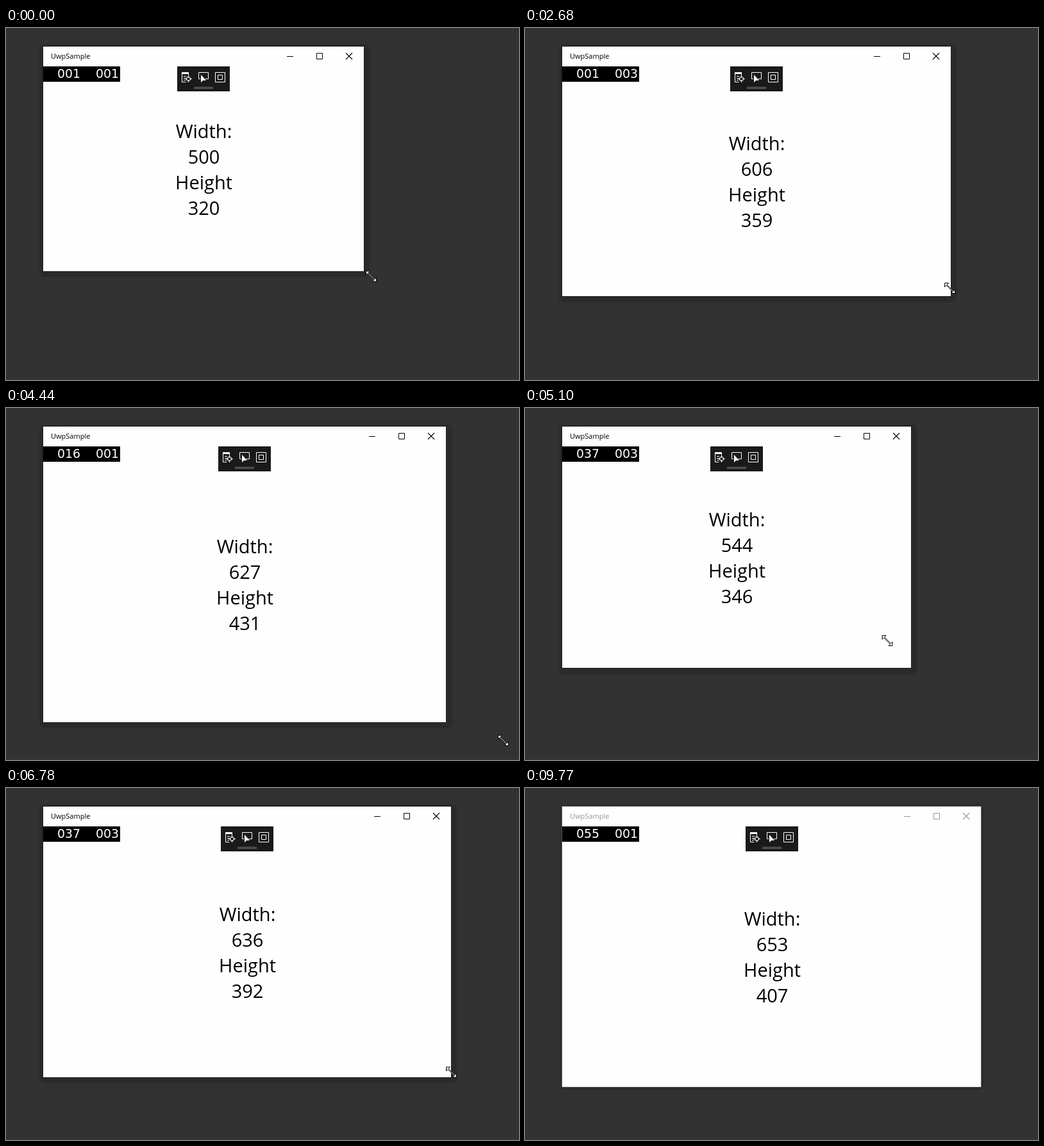
Animation, 800 px wide and 550 px high, one loop 9.87 s. Source, as an HTML page:

```html
<!DOCTYPE html>
<html lang="en">
<head>
<meta charset="utf-8">
<title>Window resize</title>
<style>
  html, body { margin: 0; width: 100%; height: 100%; overflow: hidden; background: #323232; }
  svg { display: block; width: 800px; height: 550px; }
  text { white-space: pre; }
  .label { font: 29px "Open Sans", "Noto Sans", sans-serif; text-anchor: middle; }
  .title { font: 11px "Open Sans", "Noto Sans", sans-serif; }
  .counter { font: 18.9px "DejaVu Sans", sans-serif; fill: #fff; }
  .line { fill: none; stroke: #fff; }
  #caption { color: #000; }
  #caption.idle { color: #959595; }
</style>
</head>
<body>
<svg viewBox="0 0 800 550">
  <defs><filter id="soft" x="-5%" y="-5%" width="110%" height="110%"><feGaussianBlur stdDeviation="1"/></filter></defs>
  <rect width="800" height="550" fill="#323232"/>
  <rect y="547" width="800" height="3" fill="#393237"/>
  <rect id="shadow" rx="7" fill="#2b2b2b" filter="url(#soft)"/>
  <rect id="border"/>
  <rect id="backing" fill="#323232"/>
  <rect id="bar" fill="#fefefe"/>
  <rect id="content" fill="#fefefe"/>

  <g id="caption">
    <text class="title" x="70" y="48" fill="currentColor">UwpSample</text>
    <g id="buttons" fill="none" stroke="currentColor">
      <path d="M-120 44.5h10M-73.500 39.500h9v9h-9z"/>
      <path d="M-28 39l10 10m0-10l-10 10" stroke-width="1.1"/>
    </g>
  </g>

  <rect x="58" y="60" width="120" height="24"/>
  <text class="counter" x="80" y="78" id="rate"></text>
  <text class="counter" x="140" y="78" id="cost"></text>

  <g id="tools">
    <rect x="-41" y="60" width="82" height="39" fill="#1a1a1a"/>
    <path d="M-34 69h11v3h-11z" fill="#fff"/>
    <path class="line" d="M-33.500 72v12.500h6M-23.500 72v2M-31 75.500h4M-31 78.500h3M-31 81.500h3"/>
    <circle class="line" cx="-23.500" cy="79.500" r="3.300"/>
    <path class="line" d="M-29 79.500h4m3 0h4M-23.500 74v4m0 3v4"/>
    <path class="line" d="M-5 79.500h-2.500v-10h15v10h-5"/>
    <path d="M-4 73v12l3-3h5z" fill="#fff"/>
    <path class="line" d="M18.500 69.500h15v15h-15zM22.500 73.500h7v7h-7z"/>
    <path d="M-15 92.500h30M-15 94.500h30" stroke="#747474"/>
  </g>

  <g id="labels">
    <text class="label" y="32">Width:</text>
    <text class="label" y="72" id="width"></text>
    <text class="label" y="112">Height</text>
    <text class="label" y="152" id="height"></text>
  </g>

  <path id="cursor" fill="#fff" stroke="#000"
    d="M-8-8H-2L-4.500-5.500 5.500 4.500 8 2V8H2L4.500 5.500-5.500-4.500-8-2Z"/>
</svg>
<script>
const LOOP = 9870, LEFT = 58, TOP = 60, IDLE_FROM = 9770, CURSOR_GONE = 8500;

// Bursts of screen updates: first time, last time, count.
const bursts = [
  [150, 1170, 9], [1290, 2130, 7], [2530, 3490, 8], [3620, 4590, 8],
  [4710, 5730, 9], [5850, 6780, 8], [6900, 7860, 8], [7990, 8500, 5]
];

// time, cursor x, cursor y, content width, content height [, frame right, frame bottom, label lag]
const poses = [
  [0, 569.5, 388, 500, 320],
  [150, 575, 394, 505, 322],
  [530, 690, 455, 620, 376],
  [780, 723, 487, 654, 401],
  [1050, 715, 443, 656, 383, 713, 441],
  [1170, 713, 446, 656, 383, 713, 442],
  [2130, 712, 449, 656, 383, 713, 442],
  [2530, 705, 438, 648, 374],
  [2940, 580, 346, 525, 330],
  [3340, 475.5, 284, 500, 320],
  [3620, 475, 290, 500, 320],
  [4030, 640, 430, 545, 355],
  [4300, 775, 520, 625, 430],
  [4440, 780, 515.5, 651, 443, 721, 509],
  [4590, 777, 511, 712, 446],
  [5220, 510, 325, 500, 320],
  [5600, 755, 402, 694, 337],
  [5970, 720.5, 396.5, 673, 320, 730, 380],
  [6310, 560, 335, 510, 320],
  [6900, 729, 472, 668, 411],
  [7310, 605, 400, 550, 345],
  [7740, 700.5, 455.5, 637, 384, 695, 444, 2],
  [7990, 719, 475, 653, 407],
  [8500, 764, 565, 653, 407]
].map(([t, x, y, w, h, right = LEFT + w, bottom = TOP + h, lag = 0]) =>
  ({ t, x, y, w, h, right, bottom, lag }));

const counters = [
  [0, "001", "001"], [900, "001", "003"], [2800, "016", "001"],
  [4840, "037", "003"], [6900, "055", "003"], [7990, "055", "001"]
];

const updates = [0];
for (const [start, end, count] of bursts)
  for (let i = 0; i < count; i++)
    updates.push(Math.round((start + (end - start) * i / (count - 1)) / 10) * 10);
updates.push(IDLE_FROM);

const el = {};
document.querySelectorAll("[id]").forEach(node => el[node.id] = node);

function poseAt(t) {
  const next = poses.findIndex(p => p.t > t);
  if (next < 0) return poses[poses.length - 1];
  const a = poses[next - 1], b = poses[next], k = (t - a.t) / (b.t - a.t);
  const pose = {};
  for (const key in a) pose[key] = a[key] + (b[key] - a[key]) * k;
  return pose;
}

function box(node, left, top, right, bottom) {
  const size = { x: left, y: top, width: right - left, height: bottom - top };
  for (const name in size) node.setAttribute(name, size[name]);
}

const move = (node, x, y = 0) => node.setAttribute("transform", `translate(${x} ${y})`);

function draw(t) {
  const p = poseAt(t), idle = t >= IDLE_FROM;
  const w = Math.round(p.w), h = Math.round(p.h), lag = Math.round(p.lag);
  const right = Math.round(p.right), bottom = Math.round(p.bottom);
  const center = Math.round(LEFT + w / 2);
  const spread = idle ? 4 : 9;

  box(el.shadow, idle ? 55 : 53, 26, right + spread, bottom + spread);
  box(el.border, 57, 28, right + 1, bottom + 1);
  el.border.setAttribute("fill", idle ? "#555" : "#1c1c1c");
  box(el.backing, LEFT, 29, right, bottom);
  box(el.bar, LEFT, 29, right, TOP);
  box(el.content, LEFT, TOP, Math.min(right, LEFT + w + 4), Math.min(bottom, TOP + h + 3));

  el.caption.classList.toggle("idle", idle);
  move(el.buttons, right);
  move(el.tools, center);
  move(el.labels, center + 0.5, Math.floor(TOP + h / 2 - 80));
  el.width.textContent = w - lag;
  el.height.textContent = h;

  const [, rate, cost] = counters.filter(c => c[0] <= t).pop();
  el.rate.textContent = rate;
  el.cost.textContent = cost;

  el.cursor.style.display = t >= CURSOR_GONE ? "none" : "";
  move(el.cursor, Math.round(p.x * 2) / 2, Math.round(p.y * 2) / 2);
}

const begin = performance.now();
let shown = -1;
function tick() {
  const now = (performance.now() - begin) % LOOP;
  const step = updates.filter(u => u <= now).pop();
  if (step !== shown) draw(shown = step);
  requestAnimationFrame(tick);
}
tick();
</script>
</body>
</html>
```
